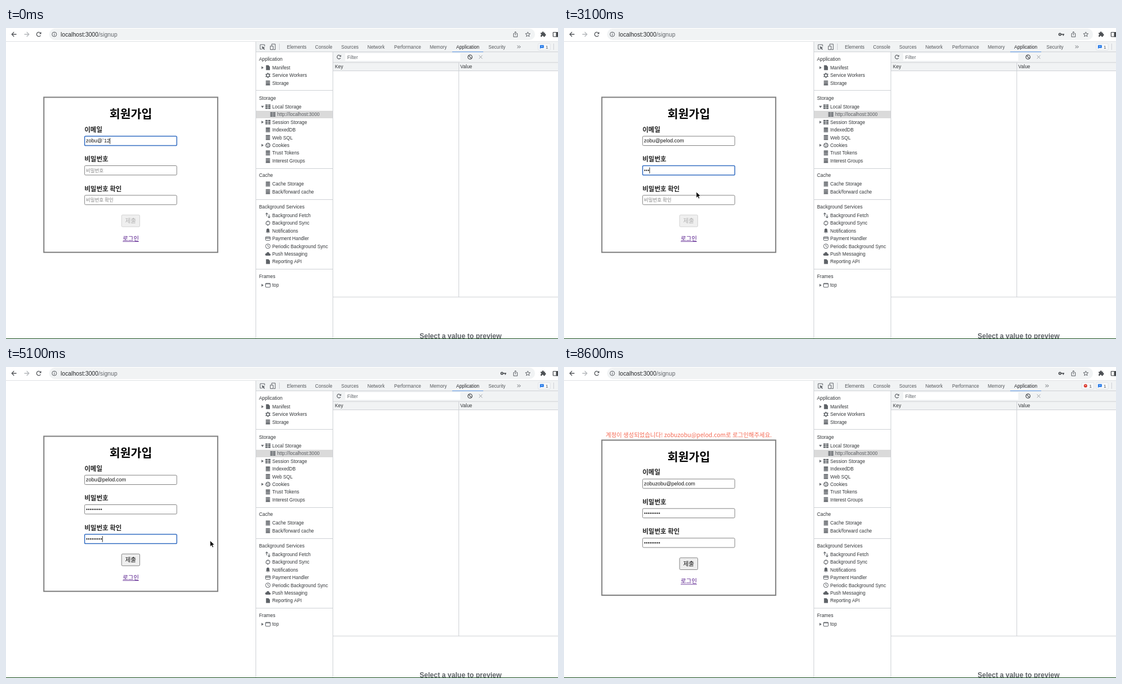
Recreate the animation shown at these times as an HTML page with a canvas. Size 960x541 px, loop 9.19 s.

```html
<!DOCTYPE html>
<html lang="ko">
<head>
<meta charset="utf-8">
<title>회원가입</title>
<style>
  html, body { margin: 0; width: 100%; height: 100%; overflow: hidden; background: #fff; }
  canvas { display: block; }
</style>
</head>
<body>
<canvas id="stage" width="960" height="541"></canvas>
<script>
const ctx = document.getElementById('stage').getContext('2d');
const LOOP = 9190, STEP = 100;
const LATIN = '"Liberation Sans", Arial, sans-serif';
const HANGUL = '"Noto Sans CJK KR", "Noto Sans CJK", sans-serif';
const INK = '#333639', GREY = '#5f6368', LINE = '#cfd2d6', BAR = '#f1f3f4', BLUE = '#1a73e8';
const NAME = 'zobu', HOST = '@pelod.com', MAIL = NAME + HOST;

// Each entry changes the form state from its time on; no caret value means the end of the text.
const END = undefined;
const script = [
  [0, { email: NAME + '@`12', pw: 0, confirm: 0, focus: 'email', caret: END, error: '', notice: '', ready: false, key: false, failed: false }],
  [100, { email: NAME + '@`' }],
  [200, { email: NAME + '@' }],
  [300, { email: NAME }],
  [400, { email: NAME + 'as' }],
  [500, { email: NAME + 'asdf' }],
  [800, { focus: '', error: 'email' }],
  [1300, { focus: 'email' }],
  [1400, { email: NAME + 'asd', error: '' }],
  [1500, { email: NAME + 'a' }],
  [1700, { email: NAME }],
  [1800, { email: NAME + '@' }],
  [1900, { email: MAIL.slice(0, 6) }],
  [2000, { email: MAIL.slice(0, 7) }],
  [2100, { email: MAIL.slice(0, 9) }],
  [2200, { email: MAIL.slice(0, 11) }],
  [2300, { email: MAIL.slice(0, 13) }],
  [2400, { email: MAIL }],
  [2600, { focus: 'pw', key: true }],
  [2800, { pw: 1 }],
  [2900, { pw: 2 }],
  [3000, { pw: 3 }],
  [3200, { focus: 'confirm', error: 'pw' }],
  [3300, { confirm: 1 }],
  [3400, { confirm: 2 }],
  [3500, { confirm: 3 }],
  [3600, { caret: -1 }],
  [4000, { focus: 'pw', caret: END }],
  [4100, { pw: 4 }],
  [4200, { pw: 6 }],
  [4300, { pw: 8 }],
  [4400, { pw: 9 }],
  [4700, { focus: 'confirm', error: '' }],
  [4800, { confirm: 6 }],
  [4900, { confirm: 9, ready: true }],
  [5400, { focus: '' }],
  [5500, { notice: '이미 존재하는 이메일이에요.', failed: true }],
  [6000, { focus: 'email', caret: 13 }],
  [6500, { caret: 11 }],
  [6600, { caret: 9 }],
  [6700, { caret: 7 }],
  [6800, { caret: 5 }],
  [6900, { caret: 3 }],
  [7000, { caret: 4 }],
  [7300, { email: NAME + 'z' + HOST, caret: 5 }],
  [7400, { email: NAME + 'zo' + HOST, caret: 6 }],
  [7500, { email: NAME + 'zob' + HOST, caret: 7 }],
  [7600, { email: NAME + MAIL, caret: 8 }],
  [7900, { focus: '' }],
  [8000, { notice: `계정이 생성되었습니다! ${NAME}${MAIL}로 로그인해주세요.` }]
];

// Pointer paths as [time, x, y]; the pointer is hidden between paths.
const paths = [
  [[600, 330, 205], [700, 352, 215], [800, 365, 221], [1000, 366, 222], [1300, 228, 190], [1400, 228, 190]],
  [[2400, 214, 236], [2500, 209, 254], [2700, 209, 254]],
  [[3100, 230, 285], [3200, 232, 305]],
  [[3700, 300, 290], [4000, 232, 242]],
  [[4500, 228, 262], [4700, 226, 304]],
  [[5000, 330, 303], [5100, 355, 302], [5400, 222, 337], [5600, 297, 196], [6000, 206, 203], [6300, 206, 203]],
  [[7700, 222, 262], [7900, 218, 341], [8000, 218, 341], [8100, 190, 292], [8300, 330, 190], [8500, 590, 2]]
];

function stateAt(t) {
  return Object.assign({}, ...script.filter(([at]) => at <= t).map(([, change]) => change));
}

function pointerAt(t) {
  const path = paths.find(p => t >= p[0][0] && t <= p[p.length - 1][0]);
  if (!path) return null;
  const i = Math.max(1, path.findIndex(p => p[0] >= t));
  const [a, b] = [path[i - 1], path[i]];
  const k = (t - a[0]) / (b[0] - a[0]);
  return [a[1] + (b[1] - a[1]) * k, a[2] + (b[2] - a[2]) * k];
}

function text(str, x, y, size, color = INK, family = LATIN, weight = 400, align = 'left') {
  ctx.font = `${weight} ${size}px ${family}`;
  ctx.fillStyle = color;
  ctx.textAlign = align;
  ctx.fillText(str, x, y + size * 0.36);
}

const korean = (str, x, y, size, color = '#000', weight = 400, align = 'left') =>
  text(str, x, y, size, color, HANGUL, weight, align);

function rect(x, y, w, h, color) {
  ctx.fillStyle = color;
  ctx.fillRect(x, y, w, h);
}

function round(x, y, w, h, r, fill, stroke, width = 1) {
  ctx.beginPath();
  ctx.roundRect(x, y, w, h, r);
  paint(fill, stroke, width);
}

function paint(fill, stroke, width = 1) {
  if (fill) { ctx.fillStyle = fill; ctx.fill(); }
  if (stroke) { ctx.strokeStyle = stroke; ctx.lineWidth = width; ctx.stroke(); }
}

// SVG path centred on x, y.
function shape(x, y, d, fill, stroke, width = 1) {
  const path = new Path2D(d);
  ctx.save();
  ctx.translate(x, y);
  if (fill) { ctx.fillStyle = fill; ctx.fill(path); }
  if (stroke) { ctx.strokeStyle = stroke; ctx.lineWidth = width; ctx.stroke(path); }
  ctx.restore();
}

function ring(x, y, r, color, width = 1, from = 0, to = Math.PI * 2) {
  ctx.beginPath();
  ctx.arc(x, y, r, from, to);
  paint(null, color, width);
}

function dot(x, y, r, color) {
  ctx.beginPath();
  ctx.arc(x, y, r, 0, Math.PI * 2);
  paint(color);
}

function reload(x, y, r, color, width) {
  ring(x, y, r, color, width, 0.5, 5.6);
  shape(x, y, `M${r + 0.6} ${-r - 0.6}V-0.4H0.6Z`, color);
}

const icons = {
  file: (x, y) => shape(x, y, 'M-3.3-4.2H1L3.5-1.6V4.2H-3.3Z', GREY),
  gear(x, y) {
    ring(x, y, 2.6, GREY, 1.4);
    for (let i = 0; i < 6; i++) dot(x + 3.8 * Math.cos(i * Math.PI / 3 + 0.5), y + 3.8 * Math.sin(i * Math.PI / 3 + 0.5), 0.9, GREY);
  },
  data(x, y) {
    for (let i = -1; i < 3; i++) round(x - 3.9, y + i * 2.2 - 2.1, 7.8, 1.75, [1.6, 1.6, 1, 1], GREY);
  },
  table(x, y) {
    for (let row = -1; row < 2; row++)
      for (const dx of [-4.4, 0.4]) rect(x + dx, y + row * 2.8 - 1.1, 4.1, 2.1, GREY);
  },
  cookie(x, y) {
    ring(x, y, 3.7, GREY, 1.2);
    [[-1.5, -1], [1.4, -1.7], [-0.8, 1.7], [1.6, 1.2]].forEach(([dx, dy]) => dot(x + dx, y + dy, 0.9, GREY));
  },
  fetch: (x, y) => shape(x, y, 'M-2 1.5V-4M-4-2L-2-4.2L0-2M2-1.5V4M0 2L2 4.2L4 2', null, GREY, 1.1),
  sync(x, y) {
    ring(x, y, 3.3, GREY, 1.1, -1.2, 1.1);
    ring(x, y, 3.3, GREY, 1.1, 1.9, 4.3);
    shape(x, y, 'M0.8-5V-1.2L-1.5-3.2Z M-0.8 5V1.2L1.5 3.2Z', GREY);
  },
  bell: (x, y) => shape(x, y, 'M-3.8 2.8L-2.6 1.4V-1C-2.6-5 2.6-5 2.6-1V1.4L3.8 2.8Z M-1 3.3H1L0 4.4Z', GREY),
  card(x, y) {
    round(x - 4, y - 3.1, 8, 6.2, 0.8, null, GREY);
    rect(x - 4, y - 1.6, 8, 1.6, GREY);
  },
  clock(x, y) {
    ring(x, y, 4, GREY);
    shape(x, y, 'M0-2.5V0.2L1.8 1.4', null, GREY);
  },
  cloud: (x, y) => shape(x, y, 'M-2.8 3C-5.6 2.8-5.2-1-2.6-1C-1.8-4 2.4-4 2.8-0.6C5.4-0.6 5.4 3 3 3Z', GREY),
  frame(x, y) {
    round(x - 4, y - 3.3, 8, 6.8, 0.7, null, GREY);
    rect(x - 4, y - 3.3, 8, 1.4, GREY);
  }
};

// Title, its height, the first row's height, then rows of label, icon and fold arrow.
const groups = [
  ['Application', 53.5, 69, [['Manifest', 'file', '>'], ['Service Workers', 'gear'], ['Storage', 'data']]],
  ['Storage', 121.5, 137, [['Local Storage', 'table', 'v'], ['http://localhost:3000', 'table', 'sub'], ['Session Storage', 'table', '>'],
    ['IndexedDB', 'data'], ['Web SQL', 'data'], ['Cookies', 'cookie', '>'], ['Trust Tokens', 'data'], ['Interest Groups', 'data']]],
  ['Cache', 256, 271.5, [['Cache Storage', 'data'], ['Back/forward cache', 'data']]],
  ['Background Services', 310.5, 326, [['Background Fetch', 'fetch'], ['Background Sync', 'sync'], ['Notifications', 'bell'],
    ['Payment Handler', 'card'], ['Periodic Background Sync', 'clock'], ['Push Messaging', 'cloud'], ['Reporting API', 'file']]],
  ['Frames', 432, 447.5, [['top', 'frame', '>']]]
];

function drawBrowserBar(s) {
  round(75, 1, 845, 20, 10, BAR);
  rect(0, 23, 960, 1, '#e0e2e5');
  shape(14, 11, 'M4.2 0H-3.8M0-4L-4 0L0 4', null, '#55585c', 1.3);
  shape(36, 11, 'M-4.2 0H3.8M0-4L4 0L0 4', null, '#b5b8bc', 1.3);
  reload(57, 11, 3.7, '#55585c', 1.3);
  ring(84, 11, 4, GREY);
  rect(83.5, 10.4, 1.1, 3, GREY);
  rect(83.5, 8.4, 1.1, 1.1, GREY);
  text('localhost:3000', 95, 11, 10.2, '#26282b');
  const w = ctx.measureText('localhost:3000').width;
  text('/signup', 95 + w, 11, 10.2, '#63676c');
  if (s.key) {
    ring(862.5, 11, 1.8, '#45484c', 1.6);
    shape(865, 11, 'M-0.5 0H5M3.4 0V2.4', null, '#45484c', 1.6);
  }
  shape(886, 11, 'M-1.6-1.4H-3.3V4.4H3.3V-1.4H1.6M0 1.8V-4.6M-1.9-2.8L0-4.7L1.9-2.8', null, GREY);
  const star = Array.from({ length: 10 }, (_, i) => {
    const r = i % 2 ? 1.9 : 4.4, a = i * Math.PI / 5 - Math.PI / 2;
    return `${(r * Math.cos(a)).toFixed(2)} ${(r * Math.sin(a)).toFixed(2)}`;
  });
  shape(907.5, 11.3, `M${star.join('L')}Z`, null, GREY);
  shape(934, 11, 'M-4.2-2.8H-1.7C-2-5.4 1.5-5.4 1.2-2.8H3.4V-0.5C5.7-0.5 5.7 2.4 3.4 2.4V4.3H0.8C0.8 2-2 2-2 4.3H-4.2V1.7C-2-0.2-2.8-0.6-4.2-0.6Z', '#4d5054');
  round(951.5, 7.5, 9, 7.5, 0.5, null, '#45484c', 1.2);
  rect(956.5, 7, 4, 8.5, '#45484c');
}

function badge(x, color, flag) {
  round(x - 10.5, 27, 21, 11.5, 1.5, '#f6f8fa', '#dcdfe3', 0.8);
  if (flag) shape(x - 4, 32.7, 'M-3.3-3H3.3V2H-1.6L-3.3 3.6Z', color);
  else dot(x - 4, 32.7, 2.9, color);
  rect(x - 5.2, 31.6, 2.4, 1, '#fff');
  text('1', x + 2.5, 32.8, 8, '#4b4e52');
}

function drawTabs(s) {
  rect(434, 24, 526, 36, BAR);
  rect(434, 41, 526, 1, LINE);
  shape(446, 33, 'M3.8-1V-4H-4V3.8H-1', null, GREY);
  shape(446, 33, 'M-1.2-1.2L4.4 1L2.2 2L4.2 4L3.2 4.9L1.2 2.9L0.3 4.6Z', GREY);
  shape(464, 33, 'M-2-2.4V-5H4.2V4.6H1.4M-4.3-1.6H0.6V4.6H-4.3Z', null, GREY);
  rect(475, 27, 1, 11, LINE);
  const tabs = [['Elements', 488.5], ['Console', 537.5], ['Sources', 583], ['Network', 628.5], ['Performance', 675], ['Memory', 737], ['Application', 783]];
  if (!s.failed) tabs.push(['Security', 839]);
  for (const [name, x] of tabs) text(name, x, 33, 8.2, name === 'Application' ? '#202124' : '#55585c');
  rect(776, 41, 54, 1, '#5b93e0');
  const more = s.failed ? 840 : 892;
  shape(more, 32.8, 'M-2.7-2.3L-0.4 0L-2.7 2.3M0.3-2.3L2.6 0L0.3 2.3', null, GREY);
  if (s.failed) badge(911, '#d93025');
  badge(936, BLUE, true);
  rect(952, 27, 1, 11, LINE);
}

function drawSidebar() {
  rect(434, 42, 134, 498, '#fff');
  rect(434, 144, 134, 13, '#dadada');
  for (const y of [108, 244, 298, 419]) rect(434, y, 134, 1, LINE);
  for (const [title, y, first, rows] of groups) {
    text(title, 440, y, 8.4);
    rows.forEach(([label, icon, fold], i) => {
      const rowY = first + i * 13.4, indent = fold === 'sub' ? 8.5 : 0;
      icons[icon](455.5 + indent, rowY);
      text(label, 463 + indent, rowY, 8.25, indent ? '#5a5d61' : INK);
      if (fold === '>') shape(446, rowY, 'M-1.6-2.5L2 0L-1.6 2.5Z', GREY);
      if (fold === 'v') shape(446, rowY, 'M-2.5-1.6H2.5L0 2Z', GREY);
    });
  }
  rect(434, 24, 1, 516, LINE);
}

function drawStoragePane() {
  rect(568, 42, 392, 18, BAR);
  reload(579, 50.5, 3.2, GREY, 1.2);
  rect(590, 44, 200, 13, '#fff');
  text('Filter', 593.5, 51, 8.3, '#63676c');
  ring(807, 50.5, 3.7, '#4d5054', 1.2);
  shape(807, 50.5, 'M-2.6-2.6L2.6 2.6', null, '#4d5054', 1.2);
  shape(825.5, 50.5, 'M-2.8-2.8L2.8 2.8M2.8-2.8L-2.8 2.8', null, '#9a9da1');
  rect(568, 60, 392, 14, BAR);
  rect(568, 59.5, 392, 1, LINE);
  rect(568, 74, 392, 1, LINE);
  text('Key', 572, 67.5, 8.3);
  text('Value', 790, 67.5, 8.3);
  rect(787, 60, 1, 408, LINE);
  rect(568, 467.5, 392, 1, LINE);
  rect(568, 42, 1, 498, LINE);
  text('Select a value to preview', 790.5, 535.5, 12.05, '#5f6368', LATIN, 700, 'center');
}

function drawField(s, id, y, label, value) {
  const focused = s.focus === id, masked = typeof value === 'number';
  korean(label, 136.5, y - 19.5, 11.25, '#222', 700);
  round(136.7, y - 8, 160.3, 16.3, 1.8, '#fff', focused ? '#3a72c4' : '#858585', focused ? 1.5 : 1);
  let caretX = 139;
  if (masked) {
    for (let i = 0; i < value; i++) dot(140.6 + i * 3.15, y + 0.2, 1.1, '#111');
    caretX += value * 3.15;
    if (!value) korean(label, 139, y, 8.35, '#858585');
  } else {
    text(value, 139, y, 8.95, '#111');
    caretX += ctx.measureText(value.slice(0, s.caret)).width;
  }
  if (focused && s.caret !== -1) rect(caretX, y - 5, 0.9, 10.5, '#111');
}

function drawForm(s) {
  const grow = s.error ? 8.3 : 0;
  const shift = s.notice ? 6.7 : -grow;
  const after = s.error ? 8.2 : shift;
  const pwShift = s.error === 'email' ? after : shift;
  round(65.8, 120.5 + shift, 302.4, 269.7 + 2 * grow, 0, '#fff', '#808080', 2);
  if (s.notice) korean(s.notice, 217, 118.3, 10.2, '#f56b55', 400, 'center');
  korean('회원가입', 217, 149.8 + shift, 20.1, '#000', 700, 'center');
  drawField(s, 'email', 196.2 + shift, '이메일', s.email);
  drawField(s, 'pw', 247.5 + pwShift, '비밀번호', s.pw);
  drawField(s, 'confirm', 299 + after, '비밀번호 확인', s.confirm);
  if (s.error === 'email') korean('올바른 이메일 형식이 아니에요.', 136.5, 206, 10.2, '#f56b55');
  if (s.error === 'pw') korean('비밀번호는 8자리 이상 입력해주세요.', 136.5, 257.5, 10.2, '#f56b55');
  round(201, 325.2 + after, 31.6, 20.6, 1.8, '#efefef', s.ready ? '#858585' : '#d4d4d4');
  korean('제출', 216.8, 335.4 + after, 10.3, s.ready ? '#111' : '#b0b0b0', 400, 'center');
  korean('로그인', 217, 366 + after, 10.2, '#551a8b', 400, 'center');
  rect(203, 371 + after, 28, 0.8, '#551a8b');
  return [196.2 + shift, 247.5 + pwShift, 299 + after];
}

function drawPointer(point, fields) {
  if (!point) return;
  const [x, y] = point;
  const overField = x > 136 && x < 297 && fields.some(fy => Math.abs(y - fy) < 9);
  if (overField) shape(x, y, 'M-2.5-5.5Q0-5.5 0-4Q0-5.5 2.5-5.5M0-4V4M-2.5 5.5Q0 5.5 0 4Q0 5.5 2.5 5.5M-1.5 1.5H1.5', null, '#222', 1);
  else shape(x, y, 'M0 0V10.6L2.5 8.3L4.1 12L6 11.2L4.4 7.6H7.8Z', '#000', '#fff', 0.8);
}

function draw(now) {
  const t = Math.floor(now % LOOP / STEP) * STEP;
  const s = stateAt(t);
  rect(0, 0, 960, 541, '#fff');
  drawBrowserBar(s);
  const fields = drawForm(s);
  drawTabs(s);
  drawSidebar();
  drawStoragePane();
  drawPointer(pointerAt(t), fields);
  rect(0, 540, 960, 1, '#174d1c');
}

let start;
function tick(now) {
  start ??= now;
  draw(now - start);
  requestAnimationFrame(tick);
}
requestAnimationFrame(tick);
</script>
</body>
</html>
```
